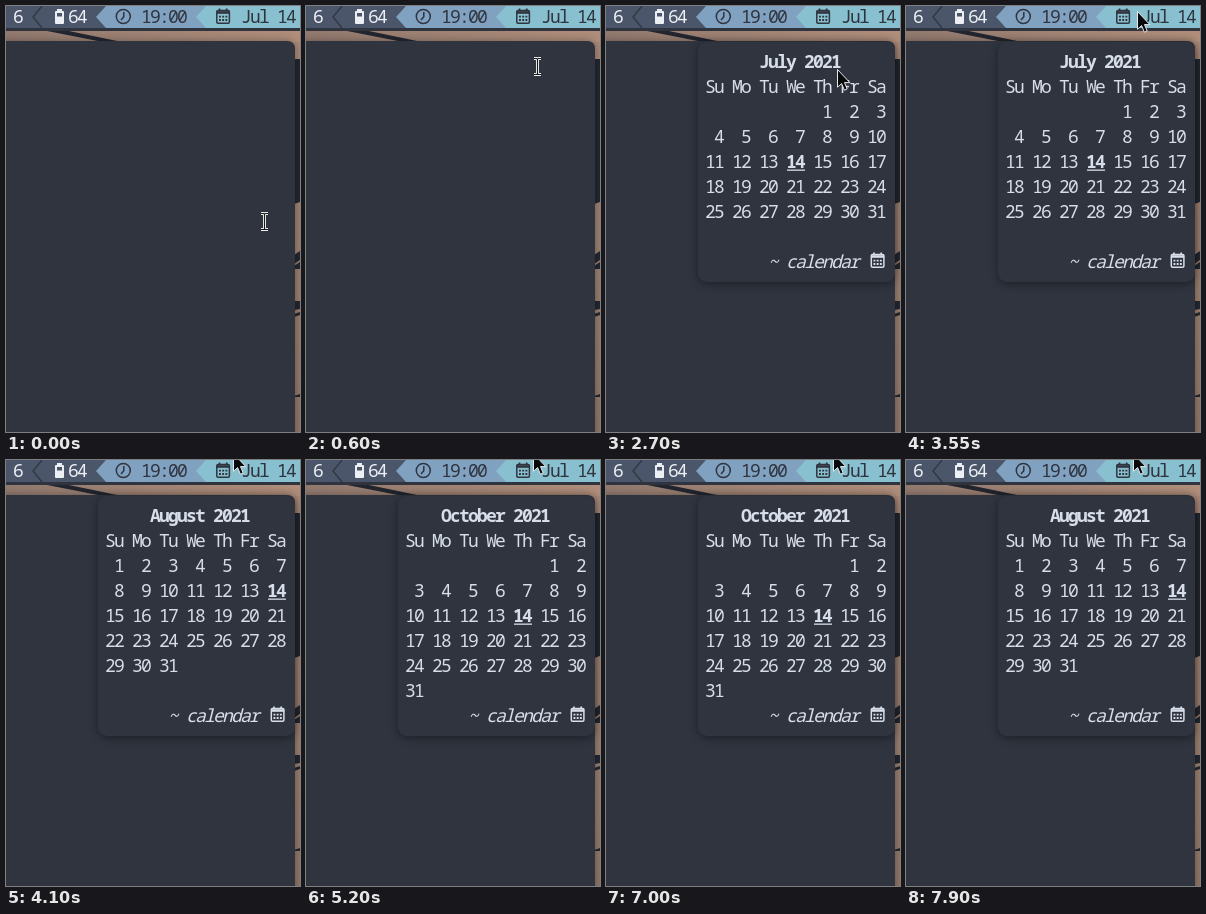
An HTML page for the animation above (8 s loop, 294 by 426 pixels).

```html
<!DOCTYPE html>
<html lang="en">
<head>
<meta charset="utf-8">
<title>Calendar popup</title>
<style>
  html, body { margin: 0; width: 100%; height: 100%; overflow: hidden; background: #2f343f; }
  svg { display: block; width: 294px; height: 426px; }
  text {
    font: 18px "Noto Sans Mono", "DejaVu Sans Mono", monospace;
    font-stretch: extra-condensed;
    text-anchor: middle;
    white-space: pre;
    fill: #d8dee9;
  }
  .light { fill: #eceff4; }
  .dark { fill: #2f343f; }
  .bold { font-weight: 600; }
  .italic { font-style: italic; }
  #window { filter: drop-shadow(0 0 4px rgba(0, 0, 0, .35)); }
  #popup rect:first-child { filter: drop-shadow(0 2px 4px rgba(0, 0, 0, .4)); }
</style>
</head>
<body>
<svg viewBox="0 0 294 426">
  <defs>
    <linearGradient id="tan">
      <stop offset="0" stop-color="#927a6f"/>
      <stop offset="1" stop-color="#b08e7b"/>
    </linearGradient>
    <linearGradient id="side" x2="0" y2="1">
      <stop offset="0" stop-color="#a98877"/>
      <stop offset="1" stop-color="#8f7767"/>
    </linearGradient>
    <g id="calendarIcon" fill="none" stroke="currentColor">
      <rect x="1.8" y="2.6" width="12.6" height="12.6" rx="1.2" stroke-width="1.5"/>
      <path d="M1.5 4.5H14.7" stroke-width="2.6"/>
      <path d="M4.5 .5V3M11.7 .5V3" stroke-width="1.7"/>
      <path d="M4 8.7H12.5M4 12H12.5" stroke-width="1.8" stroke-dasharray="1.9 1.3"/>
    </g>
  </defs>

  <!-- wallpaper and window -->
  <rect y="24" width="294" height="14" fill="url(#tan)"/>
  <rect x="280" y="36" width="14" height="390" fill="url(#side)"/>
  <path fill="#23262f" d="M36 24H58L116 36H97ZM288 53H294V196L288 198ZM288 249L294 245V254L288 258ZM288 260L294 256V263H288ZM288 295H294V303L288 304ZM288 308L294 306V309L288 311ZM288 390L294 388V391H288Z"/>
  <path id="window" fill="#2f343f" d="M-9 35H281Q289 35 289 43V440H-9Z"/>

  <!-- status bar -->
  <rect width="294" height="25" fill="#2f343f"/>
  <rect width="110" height="22" fill="#4c566a"/>
  <path d="M36 0L27 11 36 22" fill="none" stroke="#2f343f" stroke-width="1.2"/>
  <path d="M294 0H100L90 11 100 22H294Z" fill="#81a1c1"/>
  <path d="M294 0H200L190 11 200 22H294Z" fill="#88c0d0"/>
  <path fill="#eceff4" fill-rule="evenodd" d="M51 3H56V5H57Q58 5 58 6V17Q58 18 57 18H50Q49 18 49 17V6Q49 5 50 5H51ZM51 7V10.5H56V7Z"/>
  <g fill="none" stroke="#2f343f" stroke-width="1.5">
    <circle cx="117.3" cy="10.5" r="7"/>
    <path d="M117.8 6V10.8L115 14"/>
  </g>
  <use href="#calendarIcon" x="209" y="2" color="#2f343f"/>
  <g id="bar"></g>

  <g id="popup">
    <rect x="92" y="36" width="197" height="240" rx="9" fill="#2f343f"/>
    <g id="month"></g>
    <use href="#calendarIcon" x="263.5" y="246" color="#d8dee9"/>
  </g>

  <g id="beam" fill="none">
    <path id="beamShape" d="M-3.5 -8H-1Q0 -8 0 -7Q0 -8 1 -8H3.5M0 -7V7M-3.5 8H-1Q0 8 0 7Q0 8 1 8H3.5" stroke="#f0f0f0" stroke-width="3"/>
    <path id="beamCore" stroke="#16181d" stroke-width="1.1"/>
  </g>
  <path id="arrow" d="M.5 .5V18.2L4.6 14.6 7.4 21.2 10.2 20 7.5 13.6H12.8Z" fill="#08090b" stroke="#e8e8e8"/>
</svg>
<script>
const $ = id => document.getElementById(id);
const LOOP = 8000, STEP = 50, CELL = 9, LEFT = 100, LINE = 25;

// time, month index
const months = [[1300, 6], [3900, 7], [4550, 8], [5200, 9], [5950, 10],
  [6400, 11], [6700, 10], [7000, 9], [7550, 8], [7900, 7]];

// time, x, y of the pointer
const path = [[0, 258, 215], [50, 258, 212], [350, 247, 130], [600, 231, 60],
  [700, 227, 34], [850, 237, 9], [950, 237, 9], [1000, 235, 6], [1650, 235, 6],
  [2150, 232, 69], [2650, 232, 69], [2700, 231, 63], [3100, 232, 9],
  [3500, 232, 8], [3700, 227, -6], [4050, 227, -6], [4100, 227, -7], [LOOP, 227, -7]];

// Monospaced line: every character is centred in its own cell.
function line(x, y, string, style = "") {
  const xs = [...string].map((_, i) => x + (i + .5) * CELL);
  return `<text class="${style}" x="${xs.join(" ")}" y="${y}">${string}</text>`;
}

function monthMarkup(month) {
  const first = new Date(2021, month, 1);
  const title = first.toLocaleString("en", { month: "long" }) + " 2021";
  const count = new Date(2021, month + 1, 0).getDate();
  let out = line(LEFT + Math.ceil((20 - title.length) / 2) * CELL, 62, title, "bold")
    + line(LEFT, 87, "Su Mo Tu We Th Fr Sa")
    + line(LEFT + 7 * CELL, 262, "~ calendar", "italic");
  for (let day = 1; day <= count; day++) {
    const slot = day - 1 + first.getDay();
    const x = LEFT + slot % 7 * 3 * CELL;
    const y = 112 + Math.floor(slot / 7) * LINE;
    out += line(x, y, String(day).padStart(2), day === 14 ? "bold" : "");
    if (day === 14) out += `<rect x="${x}" y="${y + 1.5}" width="18" height="1.3" fill="#d8dee9"/>`;
  }
  return out;
}

function pointerAt(t) {
  const i = Math.max(1, path.findIndex(p => p[0] >= t));
  const [t0, x0, y0] = path[i - 1], [t1, x1, y1] = path[i];
  const k = (t - t0) / (t1 - t0);
  return [Math.round(x0 + (x1 - x0) * k), Math.round(y0 + (y1 - y0) * k)];
}

$("bar").innerHTML = line(8, 17, "6", "light") + line(63, 17, "64", "light")
  + line(136, 17, "19:00", "dark") + line(236, 17, "Jul 14", "dark");
$("beamCore").setAttribute("d", $("beamShape").getAttribute("d"));

let shown;
function render(now) {
  const t = Math.floor(now % LOOP / STEP) * STEP;
  const entry = months.filter(m => m[0] <= t).pop();
  $("popup").style.display = entry ? "" : "none";
  if (entry && entry[1] !== shown) $("month").innerHTML = monthMarkup(shown = entry[1]);

  const [x, y] = pointerAt(t);
  const overText = !entry && y > 35;
  $("beam").style.display = overText ? "" : "none";
  $("arrow").style.display = overText ? "none" : "";
  $("beam").setAttribute("transform", `translate(${x + .5} ${y + .5})`);
  $("arrow").setAttribute("transform", `translate(${x} ${y})`);
}

let start;
function tick(now) {
  start ??= now;
  render(now - start);
  requestAnimationFrame(tick);
}
render(0);
requestAnimationFrame(tick);
</script>
</body>
</html>
```
